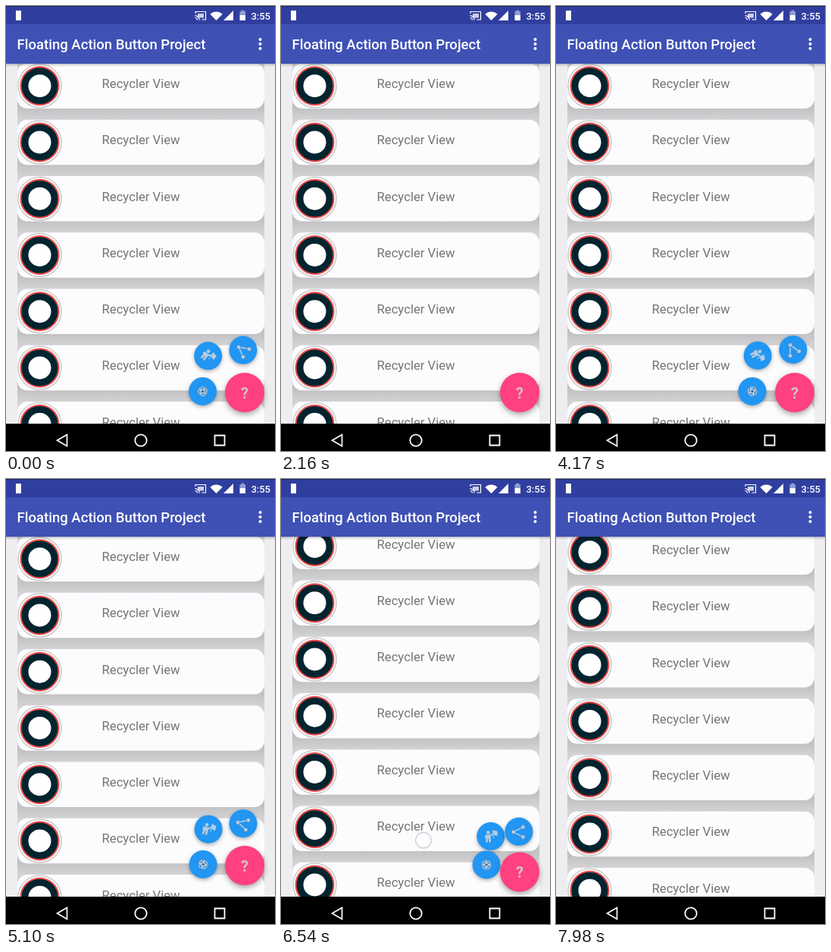
Write an HTML page with a canvas that moves like this. It is 355 by 586 pixels and loops after 8000 ms.

```html
<!DOCTYPE html>
<html lang="en">
<head>
<meta charset="utf-8">
<title>Floating Action Button Project</title>
<style>
  html, body { margin: 0; width: 100%; height: 100%; overflow: hidden; background: #eeeef0; }
  canvas { display: block; width: 355px; height: 586px; }
</style>
</head>
<body>
<canvas id="stage"></canvas>
<script>
const W = 355, H = 586, LOOP = 8000, TAU = Math.PI * 2;
const FONT = 'Roboto, "Open Sans", sans-serif';
const canvas = document.getElementById('stage');
const ratio = window.devicePixelRatio || 1;
canvas.width = W * ratio;
canvas.height = H * ratio;
const ctx = canvas.getContext('2d');

const clamp = v => Math.max(0, Math.min(1, v));
const lerp = (a, b, p) => a + (b - a) * p;
const overshoot = v => { const s = v - 1; return s * s * (3 * s + 2) + 1; };

function rect(x, y, w, h, fill) {
  ctx.fillStyle = fill;
  ctx.fillRect(x, y, w, h);
}

function disc(x, y, r, fill) {
  ctx.beginPath();
  ctx.arc(x, y, r, 0, TAU);
  ctx.fillStyle = fill;
  ctx.fill();
}

function ring(x, y, r, width, color) {
  ctx.beginPath();
  ctx.arc(x, y, r, 0, TAU);
  ctx.lineWidth = width;
  ctx.strokeStyle = color;
  ctx.stroke();
}

function path(points, closed) {
  ctx.beginPath();
  points.forEach(([x, y], i) => i ? ctx.lineTo(x, y) : ctx.moveTo(x, y));
  if (closed) ctx.closePath();
}

function shape(points, fill) {
  path(points, true);
  ctx.fillStyle = fill;
  ctx.fill();
}

function line(points, width, color, closed) {
  path(points, closed);
  ctx.lineWidth = width;
  ctx.strokeStyle = color;
  ctx.stroke();
}

function text(str, x, y, size, weight, color, align = 'left') {
  ctx.font = `${weight} ${size}px ${FONT}`;
  ctx.textAlign = align;
  ctx.fillStyle = color;
  ctx.fillText(str, x, y);
}

function shadow(alpha, blur, dy) {
  ctx.shadowColor = `rgba(0,0,0,${alpha})`;
  ctx.shadowBlur = blur * ratio;
  ctx.shadowOffsetY = dy * ratio;
}

// List
const ROW = 74.25, CARD = 59.5, LIST_TOP = 75.5;

function card(y) {
  const under = ctx.createLinearGradient(0, y + 45, 0, y + ROW);
  under.addColorStop(0, '#bcbcbe');
  under.addColorStop(0.5, '#c3c3c5');
  under.addColorStop(1, '#d3d3d5');
  rect(15, y, 326, ROW + 0.5, '#d3d3d5');
  rect(15, y + 45, 326, ROW - 45, under);

  ctx.beginPath();
  ctx.roundRect(15, y, 326, CARD, 13);
  ctx.fillStyle = '#fcfcfe';
  ctx.fill();

  const cx = 44.5, cy = y + 29.7;
  disc(cx, cy, 29, '#fdfdfd');
  ring(cx, cy, 28.5, 1.5, '#c9c9cb');
  disc(cx, cy, 25, '#02242f');
  ring(cx, cy, 25, 2, '#f04c4c');
  disc(cx, cy, 15, '#ffffff');
  text('Recycler View', 126.5, y + 32.5, 16.7, 400, '#757577');
}

function scrollAt(t) {
  const drag = clamp((t - 6400) / 350);
  const fling = clamp((t - 6750) / 1230);
  return 63.7 * drag ** 1.5 + 242.3 * (1 - (1 - fling) ** 1.4);
}

function list(offset) {
  rect(0, 76, W, 474, '#eeeef0');
  const first = Math.floor(offset / ROW);
  for (let i = first; i < first + 8; i++) card(LIST_TOP + i * ROW - offset);
}

// Icons on the small buttons
const PALE = '#b4cce2', INK = '#2a6aa3';

function shareIcon() {
  const nodes = [[-7, 0.5], [5.5, -6], [5.5, 7]];
  line([nodes[1], nodes[0], nodes[2]], 1.6, PALE);
  for (const [x, y] of nodes) {
    disc(x, y, 2.8, PALE);
    ring(x, y, 2.8, 0.5, INK);
  }
}

function flagIcon() {
  disc(-3.5, -5, 2.3, PALE);
  shape([[-7, -2], [-1, -2], [3, -4], [3.5, -2.5], [0, 0], [0, 8], [-2.5, 8],
    [-3.2, 3.5], [-4, 8], [-6.5, 8], [-6.5, 2], [-8, 2]], PALE);
  shape([[3, -8], [9, -6.5], [9, -0.5], [4, -1.5]], PALE);
  line([[2.8, -8], [3.6, 3]], 1, PALE);
  line([[-3.2, 3], [-3.2, 8]], 0.6, INK);
}

function compassIcon() {
  const star = [];
  for (let i = 0; i < 8; i++) {
    const a = i * TAU / 8, r = i % 2 ? 3.4 : 8.5;
    star.push([r * Math.sin(a), -r * Math.cos(a)]);
  }
  ring(0, 0, 5.6, 1.4, PALE);
  shape(star, PALE);
  line(star, 0.6, INK, true);
  disc(0, 0, 1.6, INK);
}

// Floating menu
const HUB = { x: 315, y: 509 };
const MINIS = [
  { x: -47.5, y: -47.5, icon: flagIcon },
  { x: -2, y: -55, icon: shareIcon },
  { x: -54.5, y: -1.5, icon: compassIcon }
];
const CYCLES = [{ open: -1610, close: 1148 }, { open: 3330, close: 6240 }];

function menu(t) {
  const { open, close } = CYCLES[t < 3000 ? 0 : 1];
  if (t < open) return;
  const grow = overshoot(clamp((t - open) / 2000));
  const shrink = clamp((t - close) / 700) ** 2;
  if (shrink === 1) return;
  const spread = (grow > 1 ? lerp(1, grow, 0.3) : grow) * (1 - shrink);
  const alpha = clamp(grow * 2) * (1 - shrink ** 4);

  for (const { x, y, icon } of MINIS) {
    ctx.save();
    ctx.globalAlpha = alpha;
    ctx.translate(HUB.x + lerp(3, x, spread), HUB.y + lerp(1, y, spread));
    shadow(0.32, 5, 2);
    disc(0, 0, 18.5, '#2196f3');
    shadow(0, 0, 0);
    ctx.rotate(grow * 2 * TAU);
    icon();
    ctx.restore();
  }
}

function mainButton(t) {
  const drop = 52 * (Math.max(0, t - 6400) / 350) ** 2;
  if (drop > 80) return;
  const y = HUB.y + drop;
  ctx.save();
  shadow(0.35, 7, 3);
  disc(HUB.x, y, 26, '#ff4081');
  ctx.restore();
  const press = Math.max(clamp(1 - Math.abs(t - 1400) / 400), clamp(1 - Math.abs(t - 3550) / 200));
  if (press) disc(HUB.x, y, 26, `rgba(255,255,255,${0.07 * press})`);
  text('?', HUB.x, y + 7.5, 20, 700, '#d3c3c9', 'center');
}

function touch(t, offset) {
  const alpha = clamp((t - 6290) / 40) * clamp((6700 - t) / 80);
  if (!alpha) return;
  ctx.save();
  ctx.globalAlpha = alpha;
  disc(188, 492 - offset, 10.5, 'rgba(255,255,255,0.65)');
  ring(188, 492 - offset, 10.3, 1.3, '#cbd0d6');
  ctx.restore();
}

// Fixed bars
function wedge(x, y, r) {
  ctx.beginPath();
  ctx.moveTo(x, y);
  ctx.arc(x, y, r, -Math.PI * 0.75, -Math.PI * 0.25);
  ctx.closePath();
  ctx.fillStyle = '#fff';
  ctx.fill();
}

function castIcon() {
  line([[250, 10], [250, 7.5], [263.5, 7.5], [263.5, 18], [258.5, 18]], 1.2, '#fff');
  rect(253, 10, 8, 5.5, 'rgba(255,255,255,0.75)');
  for (const r of [3, 5.8]) {
    ctx.beginPath();
    ctx.arc(249.5, 18.5, r, -Math.PI / 2, 0);
    ctx.lineWidth = 1.2;
    ctx.strokeStyle = '#fff';
    ctx.stroke();
  }
}

function topBars() {
  const fade = ctx.createLinearGradient(0, 76, 0, 80);
  fade.addColorStop(0, 'rgba(0,0,0,0.22)');
  fade.addColorStop(1, 'rgba(0,0,0,0)');
  rect(0, 76, W, 4, fade);
  rect(0, 0, W, 24, '#303f9f');
  rect(0, 0, W, 1, '#1c2560');
  rect(0, 24, W, 52, '#3f51b5');

  rect(13, 6, 7, 13, '#fff');
  castIcon();
  wedge(277.5, 19, 11.5);
  shape([[300, 6], [300, 19], [287, 19]], '#fff');
  rect(310.5, 5.5, 3.5, 2, '#8f9bd4');
  rect(308.5, 7, 7.5, 5, '#8f9bd4');
  rect(308.5, 12, 7.5, 7, '#fff');
  text('3:55', 349, 17.5, 13, 500, '#fff', 'right');

  text('Floating Action Button Project', 14.5, 57.3, 18.55, 500, '#fff');
  for (const y of [44, 50, 56]) disc(335.5, y, 2, '#fff');
}

function navBar() {
  rect(0, 550, W, 36, '#000');
  line([[67.5, 572], [80.5, 564.5], [80.5, 579.5]], 1.7, '#fff', true);
  ring(178, 572, 7.7, 1.8, '#fff');
  line([[275.5, 565.5], [288.5, 565.5], [288.5, 578.5], [275.5, 578.5]], 1.8, '#fff', true);
}

function draw() {
  const t = performance.now() % LOOP;
  const offset = scrollAt(t);
  ctx.setTransform(ratio, 0, 0, ratio, 0, 0);
  list(offset);
  menu(t);
  mainButton(t);
  touch(t, offset);
  topBars();
  navBar();
  requestAnimationFrame(draw);
}
draw();
</script>
</body>
</html>
```
